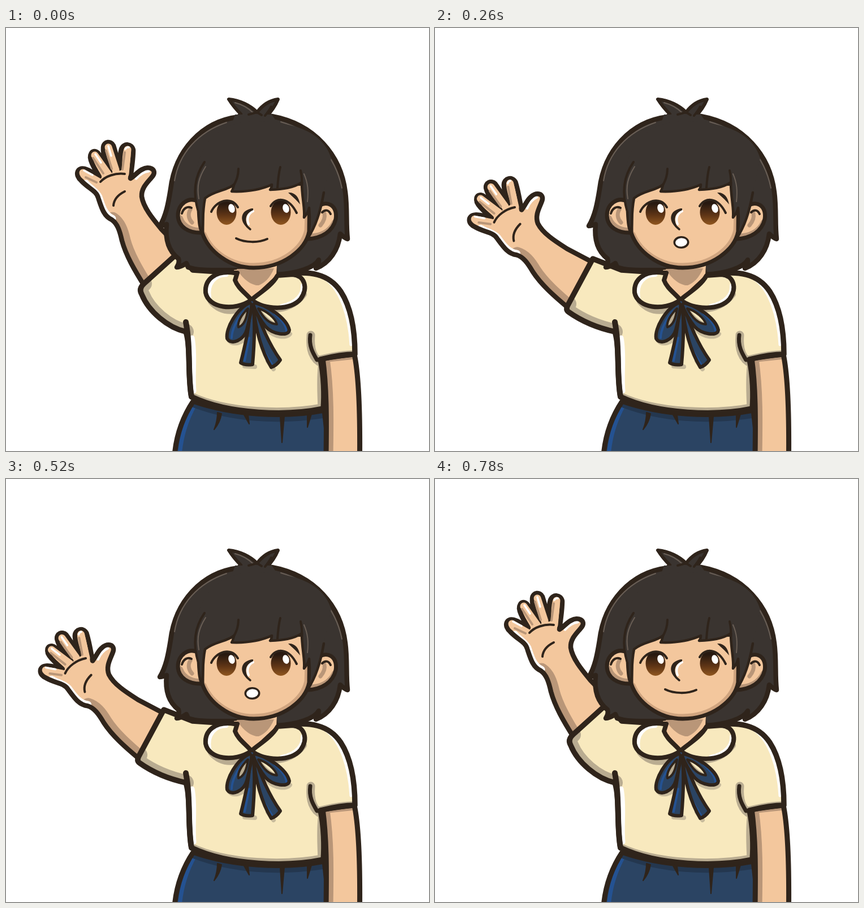
Recreate the animation shown at these times as an HTML page with a canvas. Size 748x748 px, loop 910 ms.

```html
<!DOCTYPE html>
<html lang="en">
<head>
<meta charset="utf-8">
<title>Waving girl</title>
<style>
html, body { margin: 0; width: 100%; height: 100%; overflow: hidden; background: #fff; }
canvas { display: block; width: 100vmin; height: 100vmin; }
</style>
</head>
<body>
<canvas id="stage" width="748" height="748"></canvas>
<script>
const ctx = document.getElementById("stage").getContext("2d");
const INK = "#2f241b", SKIN = "#f3c79d", SKIN_SHADE = "#b99678", HAIR = "#3a3430";
const CREAM = "#f8e9be", CREAM_SHADE = "#b9ac91", NAVY = "#2b4463", BLUE = "#245292";
const STEP = 130;
const ARM_POSES = [0, 1, 2, 2, 2, 1, 0];
const MOUTHS = ["smile", "open", "round", "open", "round", "open", "smile"];
const ARM_ANGLES = [0, -8, -18];
const SHOULDER = [362, 505];

const SLEEVES = [
  { top: "306,396", under: "C286,530 252,501 240,471 Q234,461 244,452" },
  { top: "293,402", under: "C288,530 252,507 236,485 Q231,477 239,468" },
  { top: "279,408", under: "C290,531 260,519 236,502 Q230,498 236,488" }
];

// Axis of each finger, with the shaded and lit side beside it.
const FINGERS = [
  { axis: "M136,256 L171,276", shade: "M141,264 L160,273", light: "M138,252 L153,260" },
  { axis: "M157,225 L181,259", shade: "M154,230 L172,257", light: "M158,223 L168,238" },
  { axis: "M181,211 L194,251", shade: "M177,217 L187,249", light: "M181,209 L186,226" },
  { axis: "M215,215 L211,258", shade: "M210,220 L206,250", light: "M211,214 Q214,210 217,211" }
];

function fill(d, color) {
  ctx.fillStyle = color;
  ctx.fill(new Path2D(d));
}

function line(d, width, color = INK) {
  ctx.strokeStyle = color;
  ctx.lineWidth = width;
  ctx.stroke(new Path2D(d));
}

// Each shade is [stroke path, width, color], kept inside the shape.
function shape(d, color, outline, shades = []) {
  fill(d, color);
  if (shades.length) {
    ctx.save();
    ctx.clip(new Path2D(d));
    for (const shade of shades) line(...shade);
    ctx.restore();
  }
  if (outline) line(d, outline);
}

function oval(x, y, rx, ry, color, tilt = 0) {
  ctx.beginPath();
  ctx.ellipse(x, y, rx, ry, tilt, 0, Math.PI * 2);
  ctx.fillStyle = color;
  ctx.fill();
}

function drawSkirt() {
  shape("M331,660 C311,690 301,720 298,756 L572,756 L563,676 C490,690 400,684 331,660Z", NAVY, 9, [
    ["M335,664 C318,695 310,722 307,756", 7, BLUE],
    ["M333,667 C400,692 480,698 564,685", 9, "#24374f"]
  ]);
  const pleats = "M374,680 L381,682 C379,695 374,703 368,710 C372,700 374,690 374,680Z " +
    "M421,684 L428,684 L430,700Z M485,687 L492,687 L488,733Z M533,684 L540,683 L533,706Z";
  fill(pleats, INK);
  line(pleats, 2);
}

function drawRestingArm() {
  shape("M560,583 L616,577 C625,620 626,690 625.5,756 L566,756 C567,690 567,635 560,583Z", SKIN, 9, [
    ["M563,586 C571,640 570,700 569,756", 19, SKIN_SHADE],
    ["M560,588 L618,582", 7, SKIN_SHADE]
  ]);
}

function drawWavingArm(angle) {
  ctx.save();
  ctx.translate(...SHOULDER);
  ctx.rotate(angle * Math.PI / 180);
  ctx.translate(-SHOULDER[0], -SHOULDER[1]);
  const arm = "M246,458 C227,428 212,402 205,376 C201,358 197,346 187,339 " +
    "C173,333 169,318 163,300 C160,288 146,284 133,270 C121,260 126,246 139,249 " +
    "C148,251 156,258 165,263 C159,252 150,240 149,229 C149,216 160,215 165,224 " +
    "C170,236 177,246 184,254 C178,240 171,225 172,211 C173,200 186,199 190,208 " +
    "C194,220 197,234 201,248 C201,236 201,224 204,214 C208,203 223,204 225,216 " +
    "C225,232 222,250 220,266 C227,262 234,253 241,250 C253,243 267,250 260,261 " +
    "C253,271 239,281 240,298 C243,318 261,339 275,356 L309,391Z";
  shape(arm, SKIN, 0, [
    ["M250,462 C229,428 214,402 207,376 C203,358 198,346 188,339", 27, SKIN_SHADE],
    ["M188,337 C174,331 169,315 164,299 C160,290 150,285 141,275", 13, "#fff"],
    ["M230,266 C237,258 244,254 252,253", 5, "#fff"]
  ]);
  line(arm, 8.5);
  for (const { axis, shade, light } of FINGERS) {
    line(axis, 13, SKIN);
    line(shade, 4, SKIN_SHADE);
    line(light, 3.5, "#fff");
  }
  line("M167,272 C176,262 193,256 210,258", 4);
  line("M190,314 C191,301 200,294 210,289", 4);
  ctx.restore();
}

function drawShirt({ top, under }) {
  const shirt = `M${top} L330,428 L405,433 L434,478 L482,438 C538,426 572,436 592,466 ` +
    "C610,494 617,535 617,577 C595,577 572,582 556,586 C562,615 563,650 561,673 " +
    `C500,686 395,684 328,652 C321,615 327,565 318,537 ${under}Z`;
  shape(shirt, CREAM, 0, [
    [`M318,537 ${under}`, 28, CREAM_SHADE],
    ["M326,651 C392,682 495,684 562,671", 15, CREAM_SHADE],
    ["M539,543 C537,568 542,585 560,594 C556,615 558,650 559,672", 15, CREAM_SHADE],
    ["M548,587 C575,580 600,576 617,576", 12, CREAM_SHADE],
    ["M329,548 C335,580 329,610 332,642", 9, "#fff"],
    ["M565,444 C592,463 607,509 610,560", 5, "#fff"],
    ["M362,484 C382,508 412,503 431,489 C460,505 505,502 527,471", 10, CREAM_SHADE]
  ]);
  line(shirt, 9.5);
  line("M328,652 C321,615 327,565 318,520", 10);
  line("M538,543 C535,563 544,577 550,587 L617,577", 7);
}

function drawNeckAndCollar() {
  fill("M403,428 L405,445 L434,478 L478,437 L479,420Z", SKIN);
  fill("M408,426 C420,447 437,456 447,455 C457,451 467,442 474,425Z", SKIN_SHADE);
  shape("M404,433 C370,428 351,445 353,468 C358,495 403,502 434,481 C424,469 410,460 405,446 L409,433Z", CREAM, 8, [
    ["M360,476 C356,452 370,437 390,437", 6, "#fff"]
  ]);
  shape("M480,438 C468,459 445,470 434,481 C460,500 505,499 521,479 C535,459 528,438 507,436Z", CREAM, 8, [
    ["M488,492 C515,486 526,471 525,456", 8, "#fff"]
  ]);
}

function drawBow() {
  ctx.globalAlpha = 0.75;
  line("M395,553 C402,561 420,557 425,545 M462,533 C475,548 497,548 502,541 M422,598 L440,599 M463,589 L473,603", 8, CREAM_SHADE);
  ctx.globalAlpha = 1;
  shape("M431,488 C432,525 423,560 415,592 C421,596 429,596 436,595 C439,560 441,520 437,488Z", NAVY, 6, [
    ["M430,548 L422,588", 4, BLUE]
  ]);
  shape("M437,490 C441,530 451,570 469,600 C475,598 481,593 485,587 C464,557 451,525 439,490Z", NAVY, 6, [
    ["M448,552 C454,570 463,583 470,594", 4, BLUE]
  ]);
  shape("M433,485 C408,495 388,532 391,549 C398,562 421,552 426,533 C431,514 434,500 435,486Z", NAVY, 6, [
    ["M421,501 C407,517 399,535 399,548", 4, BLUE]
  ]);
  shape("M435,485 C460,489 496,512 501,534 C500,546 472,542 459,528 C448,515 441,500 435,485Z", NAVY, 6, [
    ["M475,505 C488,516 496,526 496,537", 4, BLUE]
  ]);
  shape("M428,496 C416,507 409,520 411,529 C421,526 426,512 428,496Z", CREAM_SHADE, 4);
  shape("M446,496 C461,500 477,514 479,524 C465,523 454,511 446,496Z", CREAM, 4, [
    ["M447,498 C458,512 466,520 478,524", 5, CREAM_SHADE]
  ]);
  shape("M429,483 L435,480 L441,484 L436,491Z", NAVY, 5);
}

function drawHairBack() {
  shape("M272,350 C283,332 287,310 291,285 C299,218 345,165 412,157 L470,156 " +
    "C546,170 592,225 600,290 C604,320 601,345 604,373 C598,371 594,367 591,364 " +
    "C588,392 572,416 548,425 C552,420 553,414 553,410 C545,424 515,434 478,436 " +
    "L475,426 L409,428 C370,428 340,430 322,423 L319,416 C313,420 307,423 302,423 " +
    "C306,417 306,411 305,408 C288,395 281,375 284,347 C280,348 276,350 272,350Z", HAIR, 8.5);
  line("M298,270 C306,221 340,184 390,167", 2, "#695e55");
  line("M486,166 C545,183 583,228 594,283", 2, "#695e55");
  shape("M409,157 L415,152 C408,145 399,134 394,126 C414,128 432,137 444,149 " +
    "C453,137 466,128 481,126 C476,138 468,149 460,157Z", HAIR, 6);
  fill("M405,153 L470,153 L480,168 L400,168Z", HAIR);
  line("M405,132 C420,136 430,143 437,150", 2, "#695e55");
  line("M429,153 L444,149 L452,154 M458,155 C463,149 467,143 469,139", 4);
}

function drawHead() {
  shape("M341,307 C322,297 304,312 304,332 C305,352 323,363 347,362Z", SKIN, 7, [
    ["M306,338 C312,355 330,361 347,361", 15, SKIN_SHADE]
  ]);
  line("M326,321 C321,329 323,338 329,344", 7, SKIN_SHADE);
  line("M311,328 C314,318 321,315 328,318", 4);
  shape("M548,318 C568,302 587,314 583,338 C578,360 558,372 533,373Z", SKIN, 7, [
    ["M583,345 C574,363 556,371 536,371", 15, SKIN_SHADE]
  ]);
  line("M563,328 C565,336 561,343 556,349", 7, SKIN_SHADE);
  line("M559,326 C565,320 571,322 574,329", 4);

  shape("M347,280 L347,362 C358,395 395,424 438,424 C490,424 530,392 536,360 L537,275Z", SKIN, 7, [
    ["M349,365 C363,397 397,421 438,421 C488,421 526,391 533,358 L534,330", 11, "#cfa47f"]
  ]);
}

function drawEye(x, glintX) {
  const iris = ctx.createLinearGradient(0, 304, 0, 349);
  iris.addColorStop(0.15, "#281910");
  iris.addColorStop(0.6, "#5f3516");
  iris.addColorStop(1, "#935920");
  oval(x, 326, 17.5, 22, iris);
  oval(glintX, 319, 5.5, 8, "#fff", -0.3);
}

function drawFace(mouth) {
  drawEye(390, 399);
  drawEye(486, 495);
  line("M363,325 C371,306 398,296 410,317", 4);
  line("M468,315 C478,298 500,299 514,327", 4);
  fill("M499,291 C510,290 518,298 520,312 C512,302 507,299 499,291Z", INK);

  line("M437,324 C428,328 425,338 429,347", 4, "#fff");
  fill("M437,319 C413,321 410,344 433,358 C421,343 421,329 437,322Z", INK);
  line("M435,321 C419,324 415,343 432,356", 3.5);

  if (mouth === "smile") {
    line("M407,372 C423,380 447,380 462,373", 4);
  } else if (mouth === "open") {
    shape("M415,375 C430,374 443,373 457,372 C454,383 446,387 437,387 C426,387 419,382 415,375Z", "#fff", 4);
  } else {
    oval(435.5, 379, 14, 11, INK);
    oval(435.5, 379, 10.5, 7.5, "#fff", -0.1);
  }
}

function drawBangs() {
  const edge = "C341,345 342,355 347,364 C349,345 347,325 352,301 C370,287 390,288 403,277 " +
    "C402,283 401,286 399,289 C425,290 450,286 470,277 C470,281 469,284 467,286 " +
    "C490,285 508,283 523,273 C523,300 529,320 527,335 C533,328 535,322 536,318 " +
    "C538,340 537,358 533,373 C548,350 556,325 562,291";
  fill(`M335,270 C331,295 340,305 340,325 ${edge} L575,230 C560,180 500,165 440,165 C380,165 340,200 335,270Z`, HAIR);
  line(`M340,325 ${edge}`, 4.5);
  line("M351,237 C333,263 330,291 340,325", 4);
  line("M353,245 C341,264 337,280 341,302", 2, "#695e55");
  line("M411,249 C411,262 407,270 403,278", 4);
  line("M485,246 C482,257 481,268 480,283", 4);
  line("M521,252 C523,261 524,270 523,280", 4);
  line("M527,258 C534,274 535,288 533,307", 2, "#695e55");
}

function draw(now) {
  const beat = Math.floor(now / STEP) % ARM_POSES.length;
  const pose = ARM_POSES[beat];
  ctx.fillStyle = "#fff";
  ctx.fillRect(0, 0, 748, 748);
  ctx.lineCap = ctx.lineJoin = "round";
  drawSkirt();
  drawRestingArm();
  drawWavingArm(ARM_ANGLES[pose]);
  drawShirt(SLEEVES[pose]);
  drawHairBack();
  drawNeckAndCollar();
  drawBow();
  drawHead();
  drawBangs();
  drawFace(MOUTHS[beat]);
}

const start = performance.now();
function tick() {
  draw(performance.now() - start);
  requestAnimationFrame(tick);
}
tick();
</script>
</body>
</html>
```
